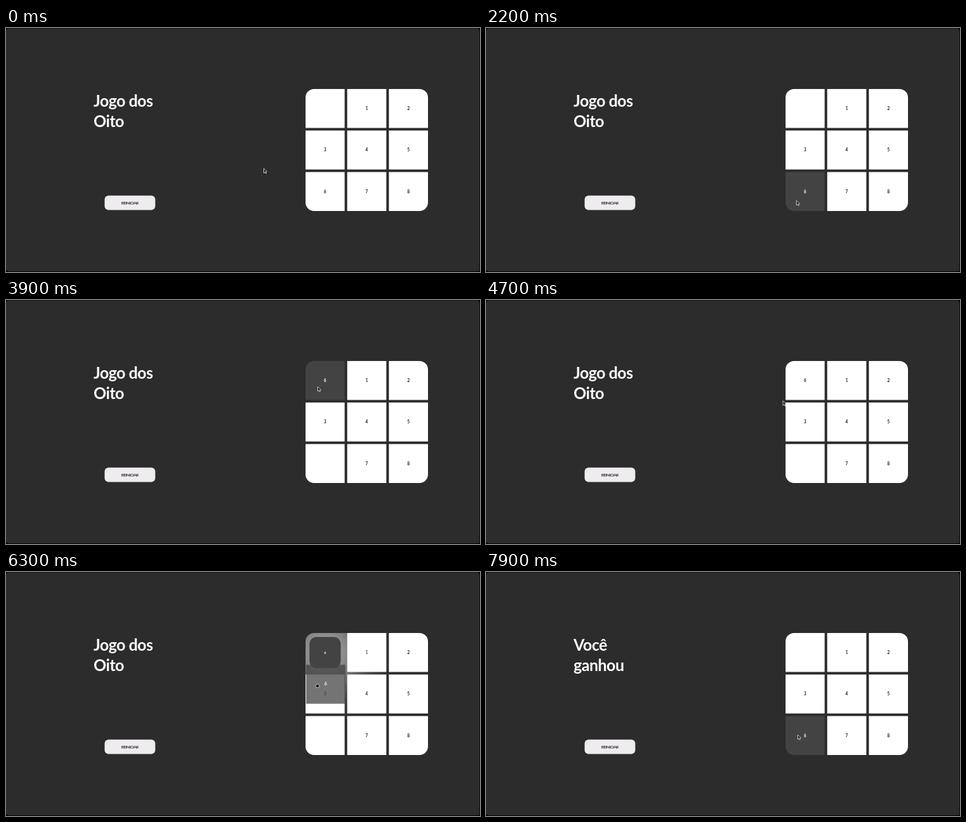
An HTML page for the animation above (8000 ms loop, 720 by 372 pixels).

```html
<!DOCTYPE html>
<html lang="pt">
<head>
<meta charset="utf-8">
<title>Jogo dos Oito</title>
<style>
  html, body { margin: 0; width: 100%; height: 100%; overflow: hidden; background: #000; }
  svg { display: block; font: 700 6.5px Lato, sans-serif; }
  #page { fill: #2c2c2c; }
  #title { fill: #fff; font-size: 24px; letter-spacing: -.45px; }
  #restart rect { fill: #eeecee; }
  #restart text { fill: #333; font-size: 6.3px; letter-spacing: -.5px; text-anchor: middle; }
  .tile rect { fill: #fff; }
  .tile text { fill: #222; text-anchor: middle; }
  #ghost { opacity: .74; }
  #ghost rect { fill: #444; }
  #ghost text { fill: #fff; }
  #glow { fill: #fff; filter: blur(30px); }
  #cursor path { fill: #1c1c1c; stroke: #ddd; stroke-width: .8; stroke-linejoin: round; }
</style>
</head>
<body>
<svg width="720" height="372" viewBox="0 0 720 372">
  <clipPath id="boardShape"><rect width="186" height="186" rx="13"/></clipPath>
  <rect id="page" y=".6" width="719.3" height="370.4" rx="4"/>
  <g id="title"><text x="133" y="119.6"></text><text x="133" y="150.8"></text></g>
  <g id="restart">
    <rect x="149.8" y="255.4" width="76.9" height="22" rx="6"/>
    <text x="188" y="268.8">REINICIAR</text>
  </g>
  <g transform="translate(455 93)"><g id="board" clip-path="url(#boardShape)"></g></g>
  <g id="ghost" class="tile"></g>
  <g id="cursor">
    <path id="arrow" d="M0 0V7L1.7 5.6 2.8 8 4 7.5 3 5.1H5Z"/>
    <path id="fist" d="M-2.8 0Q-2.8-1.2-1.6-1.2-1.4-2.6 0-2.3 1.5-2.8 2-1.6 3.4-1.5 3.2 0L2.5 2.8H-1.8Z"/>
  </g>
</svg>
<script>
const LOOP = 8000, STEP = 100, PITCH = 63.3, TILE = 59.4;
const $ = id => document.getElementById(id);
const svgNode = (name, attrs, parent) => {
  const node = document.createElementNS('http://www.w3.org/2000/svg', name);
  for (const key in attrs) node.setAttribute(key, attrs[key]);
  return parent.appendChild(node);
};

function fillTile(group, label) {
  svgNode('rect', { width: TILE, height: TILE }, group);
  svgNode('text', { x: TILE / 2, y: TILE / 2 + 2.3 }, group).textContent = label;
  return group;
}
const addTile = label => fillTile(svgNode('g', { class: 'tile' }, $('board')), label);
const move = (node, x, y, scale = 1) =>
  node.setAttribute('transform', `translate(${x} ${y}) scale(${scale})`);
const show = (node, visible) => node.style.display = visible ? 'inline' : 'none';

function place(tile, cell, scale = 1) {
  const inset = TILE * (1 - scale) / 2;
  move(tile, cell % 3 * PITCH + inset, Math.floor(cell / 3) * PITCH + inset, scale);
}

for (let n = 1; n < 9; n++) if (n !== 6) place(addTile(n), n);
const blank = addTile('');
const glow = svgNode('rect', { id: 'glow', x: -20, y: -20, width: TILE + 40, height: TILE + 40 }, $('board'));
const six = addTile(6);
const [sixFace, sixLabel] = six.children;
fillTile($('ghost'), 6);

const ramp = (t, from, to) => Math.min(1, Math.max(0, (t - from) / (to - from)));
const smooth = p => p * p * (3 - 2 * p);
const arc = p => Math.sin(Math.PI * p);
const mix = (a, b, p) => {
  const v = Math.round(a + (b - a) * p);
  return `rgb(${v},${v},${v})`;
};

// The pointer enters the board, drags up, wanders off and back, then drags down.
function pointer(t) {
  const enter = ramp(t, 900, 1850);
  const up = 1 - (1 - ramp(t, 2300, 3600)) ** 1.5;
  const wander = arc(ramp(t, 4400, 5300));
  const back = ramp(t, 4900, 5500);
  const down = smooth(ramp(t, 5700, 7100));
  return [
    391.5 + 80 * Math.sin(enter * Math.PI / 2) + 2 * up - 26 * wander - back + down,
    214 + 49 * enter ** 3 - 14 * arc(enter) - 131 * up + 25 * wander - 7 * back + 123 * down
  ];
}

const drags = [
  { from: 2300, to: 3900, dx: -19.5, dy: -43 },
  { from: 5700, to: 7600, dx: -17, dy: -32 }
];

function draw(now) {
  const t = Math.floor(now % LOOP / STEP) * STEP;
  const [x, y] = pointer(t);
  const hover = ramp(t, 1500, 1700) - ramp(t, 4400, 4700) + ramp(t, 5000, 5200);
  const drag = drags.find(d => t >= d.from && t < d.to);
  const lift = drag ? ramp(t, drag.from - STEP, drag.from + 2 * STEP) : 0;
  const won = t >= drags[1].to;
  const home = t >= drags[0].to && !won ? 0 : 6;

  place(six, home, 1 - .2 * lift);
  place(glow, home);
  place(blank, 6 - home);
  glow.style.opacity = .65 * lift;
  sixFace.style.fill = mix(255, 67, hover);
  sixLabel.style.fill = mix(34, 255, hover);
  sixFace.setAttribute('rx', 13 * lift);

  show($('ghost'), drag);
  if (drag) move($('ghost'), x + drag.dx, y + drag.dy);
  move($('cursor'), x, y);
  show($('arrow'), !drag);
  show($('fist'), drag);

  const lines = won ? ['Você', 'ganhou'] : ['Jogo dos', 'Oito'];
  lines.forEach((line, i) => $('title').children[i].textContent = line);
}

const start = performance.now();
function tick() {
  draw(performance.now() - start);
  requestAnimationFrame(tick);
}
tick();
</script>
</body>
</html>
```
